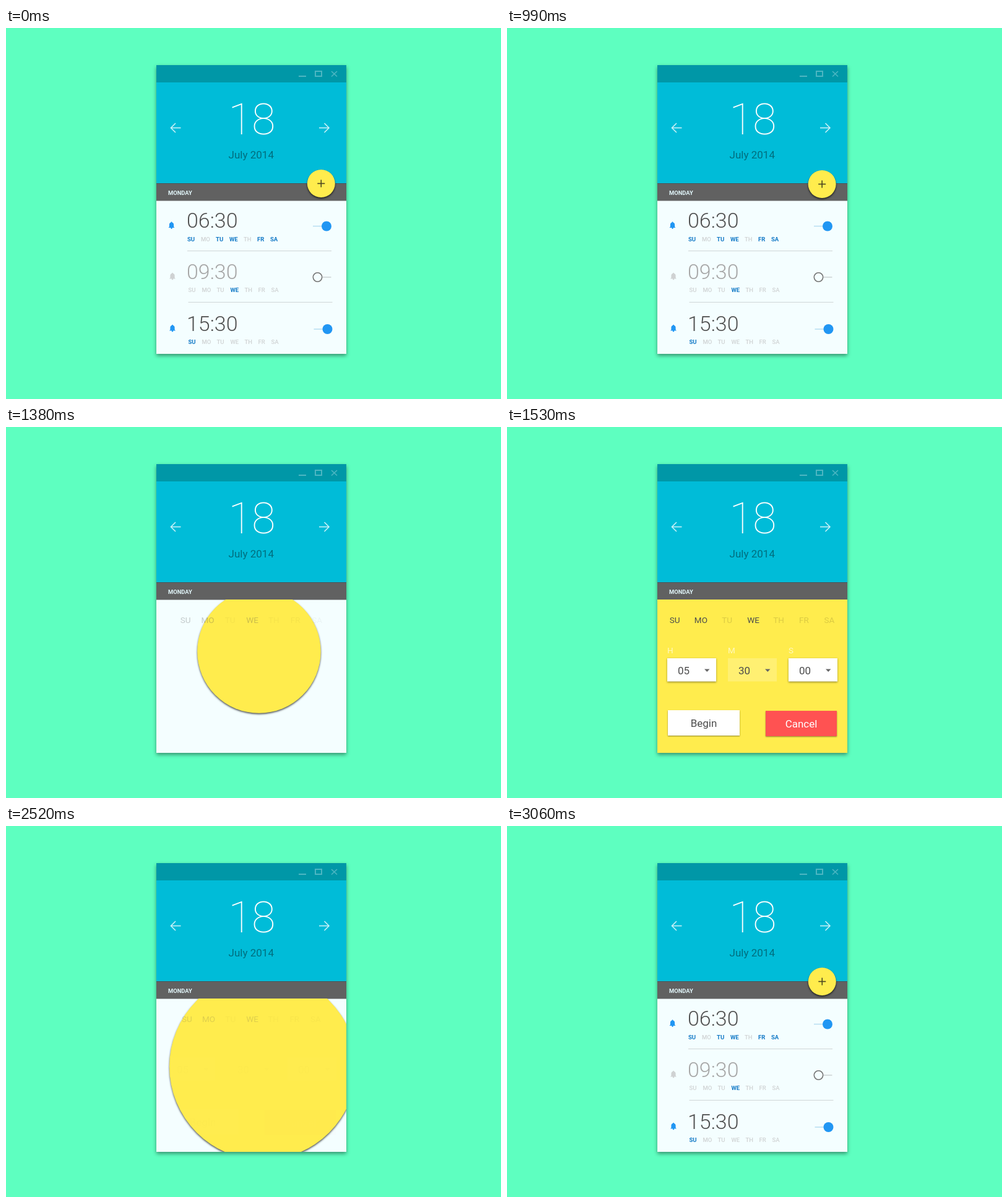
These frames come from a looping animation (800x600 px, 3.09 s). An HTML page with a canvas:

```html
<!DOCTYPE html>
<html lang="en">
<head>
<meta charset="utf-8">
<title>Alarm clock</title>
<style>
  html, body { margin: 0; width: 100%; height: 100%; overflow: hidden; background: #5effc0; }
  canvas { display: block; width: 800px; height: 600px; }
</style>
</head>
<body>
<canvas id="stage" width="800" height="600"></canvas>
<script>
const ctx = document.getElementById('stage').getContext('2d');
const LOOP = 3090, STEP = 30;
const DAYS = ['SU', 'MO', 'TU', 'WE', 'TH', 'FR', 'SA'];
const YELLOW = '#ffec4d', BLUE = '#2196f3', INK = '#4c4c4c';
const ALARMS = [
  { time: '06:30', base: 324, dx: 0, on: true, days: 'SU TU WE FR SA' },
  { time: '09:30', base: 406.5, dx: 1.5, on: false, days: 'WE' },
  { time: '15:30', base: 490.5, dx: 1.5, on: true, days: 'SU' }
];

// Eased 0..1 ramp between two times
function ease(t, a, b) {
  const u = Math.min(1, Math.max(0, (t - a) / (b - a)));
  return u * u * (3 - 2 * u);
}

// Rises while the form opens, falls while it closes
const move = (t, a, b, c, d) => ease(t, a, b) - ease(t, c, d);

// Smooth rise and fall within an interval
const bump = (t, a, b) => t > a && t < b ? Math.sin(Math.PI * (t - a) / (b - a)) ** 2 : 0;

function group(draw, alpha = 1) {
  if (alpha <= 0) return;
  ctx.save();
  ctx.globalAlpha *= alpha;
  draw();
  ctx.restore();
}

// Weakened in faded groups so it does not show through the shape
function shadow(dy, blur, alpha) {
  ctx.shadowColor = `rgba(0,0,0,${alpha * ctx.globalAlpha})`;
  ctx.shadowOffsetY = dy;
  ctx.shadowBlur = blur;
}

function rect(x, y, w, h, color) {
  ctx.fillStyle = color;
  ctx.fillRect(x, y, w, h);
}

function disc(x, y, r, color) {
  ctx.beginPath();
  ctx.arc(x, y, r, 0, 2 * Math.PI);
  ctx.fillStyle = color;
  ctx.fill();
}

function line(color, width, ...pts) {
  ctx.beginPath();
  for (let i = 0; i < pts.length; i += 2) ctx.lineTo(pts[i], pts[i + 1]);
  ctx.strokeStyle = color;
  ctx.lineWidth = width;
  ctx.stroke();
}

function text(str, x, y, size, weight, color, align = 'left') {
  ctx.font = `${weight} ${size}px Roboto, sans-serif`;
  ctx.textAlign = align;
  ctx.fillStyle = color;
  ctx.fillText(str, x, y);
}

function bell(x, y, color) {
  ctx.beginPath();
  ctx.moveTo(x - 5, y + 4);
  ctx.lineTo(x - 3.6, y + 2.4);
  ctx.lineTo(x - 3.6, y - 1);
  ctx.bezierCurveTo(x - 3.6, y - 6, x + 3.6, y - 6, x + 3.6, y - 1);
  ctx.lineTo(x + 3.6, y + 2.4);
  ctx.lineTo(x + 5, y + 4);
  ctx.fillStyle = color;
  ctx.fill();
  disc(x, y - 4.8, 0.9, color);
  disc(x, y + 4.6, 1.3, color);
}

function toggle(x, y, on) {
  if (on) {
    line('#b5ddf1', 1.5, x - 22, y, x - 7, y);
    disc(x, y, 8, BLUE);
    return;
  }
  line('#cdd2d3', 1.5, x - 8, y, x + 6, y);
  ctx.beginPath();
  ctx.arc(x - 16, y, 7.2, 0, 2 * Math.PI);
  ctx.strokeStyle = '#757575';
  ctx.lineWidth = 1.6;
  ctx.stroke();
}

function drawList(t) {
  const slide = 31.5 * move(t, 1125, 1290, 2670, 2900);
  const alpha = 1 - move(t, 1170, 1340, 2590, 2755);
  const icons = 1 - move(t, 1125, 1230, 2760, 2960);

  ALARMS.forEach(({ time, base, dx, on, days }, i) => {
    group(() => {
      ctx.translate(-slide, 0);
      text(time, 292, base - 0.8, 34, 300, on ? '#505050' : '#a6a6a6');
      DAYS.forEach((day, n) => {
        const x = [293, 315, 339, 361, 384, 406, 427][n] + dx;
        const active = days.includes(day);
        text(day, x, base + 20.5, 9.5, active ? 700 : 500, active ? '#1279c6' : '#d0d3d4');
      });
      const y = Math.round(base) + 36.5;
      if (i < 2) line('#d0d5d6', 1, 293 + dx, y, 526 + dx, y);
    }, alpha);
    group(() => {
      bell(267.5 + dx, base - 5, on ? BLUE : '#cfd2d3');
      toggle(518 + dx, base - 3.5, on);
    }, icons);
  });
}

function field(x, label, value, flat) {
  text(label, x, 366, 13.5, 400, 'rgba(255,255,255,.65)');
  group(() => {
    if (!flat) shadow(1, 3, 0.4);
    rect(x, 374, 79, 37.5, flat ? '#fff072' : '#fff');
  });
  text(value, x + 17, 399.5, 17, 400, INK);
  ctx.beginPath();
  ctx.moveTo(x + 60, 391.5);
  ctx.lineTo(x + 68.5, 391.5);
  ctx.lineTo(x + 64.25, 396);
  ctx.fillStyle = '#666';
  ctx.fill();
}

function button(label, x, y, w, fill, color, lift = 0) {
  group(() => {
    shadow(1 + lift * 1.5, 2 + lift * 3, 0.45);
    rect(x, y, w, 41, fill);
  });
  text(label, x + w / 2, y + 27, 17, 400, color, 'center');
}

function drawForm(t) {
  const spread = 0.7 + 0.3 * move(t, 1245, 1515, 2450, 2580);
  group(() => {
    DAYS.forEach((day, n) => {
      const x = 398 + (n - 3) * (n < 3 ? 42.3 : 41) * spread;
      const active = n < 2 || n === 3;
      text(day, x, 317.3, 13.5, 400, active ? INK : 'rgba(0,0,0,.14)', 'center');
    });
  }, move(t, 1325, 1480, 2440, 2550));

  group(() => {
    field(259, 'H', '05');
    field(357, 'M', '30', true);
    field(455, 'S', '00');
    button('Begin', 260, 458, 116, '#fff', INK);
    button('Cancel', 418, 459, 115, '#ff5252', '#fff', bump(t, 1910, 2220));
  }, move(t, 1390, 1525, 2440, 2525));
}

function drawHeader() {
  rect(243, 60, 307, 28, '#0097a7');
  const dim = '#4db6c2';
  line(dim, 2, 473, 78, 485, 78);
  ctx.strokeStyle = dim;
  ctx.lineWidth = 2;
  ctx.strokeRect(500, 70, 10, 8);
  line(dim, 1.7, 526, 70, 535, 78.5);
  line(dim, 1.7, 535, 70, 526, 78.5);

  rect(243, 88, 307, 164, '#00bcd8');
  text('18', 397.2, 172, 69.5, 100, '#fff', 'center');
  text('July 2014', 396.3, 211, 17, 400, 'rgba(0,0,0,.42)', 'center');
  for (const [tip, dir] of [[266.5, 1], [522, -1]]) {
    line('#c8f1f7', 1.6, tip, 161.5, tip + 16 * dir, 161.5);
    line('#c8f1f7', 1.6, tip + 7.5 * dir, 154, tip, 161.5, tip + 7.5 * dir, 169);
  }

  rect(243, 252, 307, 27.5, '#616161');
  rect(243, 251, 307, 1, '#4a5557');
  text('MONDAY', 262, 270, 9.4, 700, '#e0f4f8');
}

function drawDisc(t) {
  const x = 509.3 - 112 * move(t, 980, 1480, 2372, 2956);
  const y = 251.5 + 150.5 * move(t, 960, 1590, 2414, 3000);
  const r = 22.5 + 192 * move(t, 1234, 1570, 2400, 2712);
  const lift = bump(t, 620, 960);
  group(() => {
    // Once it grows, the disc stays below the header
    if (r > 40) {
      ctx.beginPath();
      ctx.rect(243, 279, 307, 248);
      ctx.clip();
    }
    group(() => {
      shadow(1.8 + lift * 1.5, 3 + lift * 5, 0.68);
      disc(x, y, r, YELLOW);
    });
    group(() => {
      line('#4a4520', 1.6, x - 6, y, x + 6, y);
      line('#4a4520', 1.6, x, y - 6, x, y + 6);
    }, 1 - move(t, 1020, 1170, 2760, 2940));
  });
}

function draw(t) {
  rect(0, 0, 800, 600, '#5effc0');
  group(() => {
    shadow(3, 6, 0.42);
    rect(243, 60, 307, 467, '#f4feff');
  });
  drawHeader();
  drawList(t);
  drawDisc(t);
  drawForm(t);
}

function tick() {
  const t = performance.now() % LOOP;
  draw(Math.floor(t / STEP) * STEP);
  requestAnimationFrame(tick);
}
tick();
</script>
</body>
</html>
```
